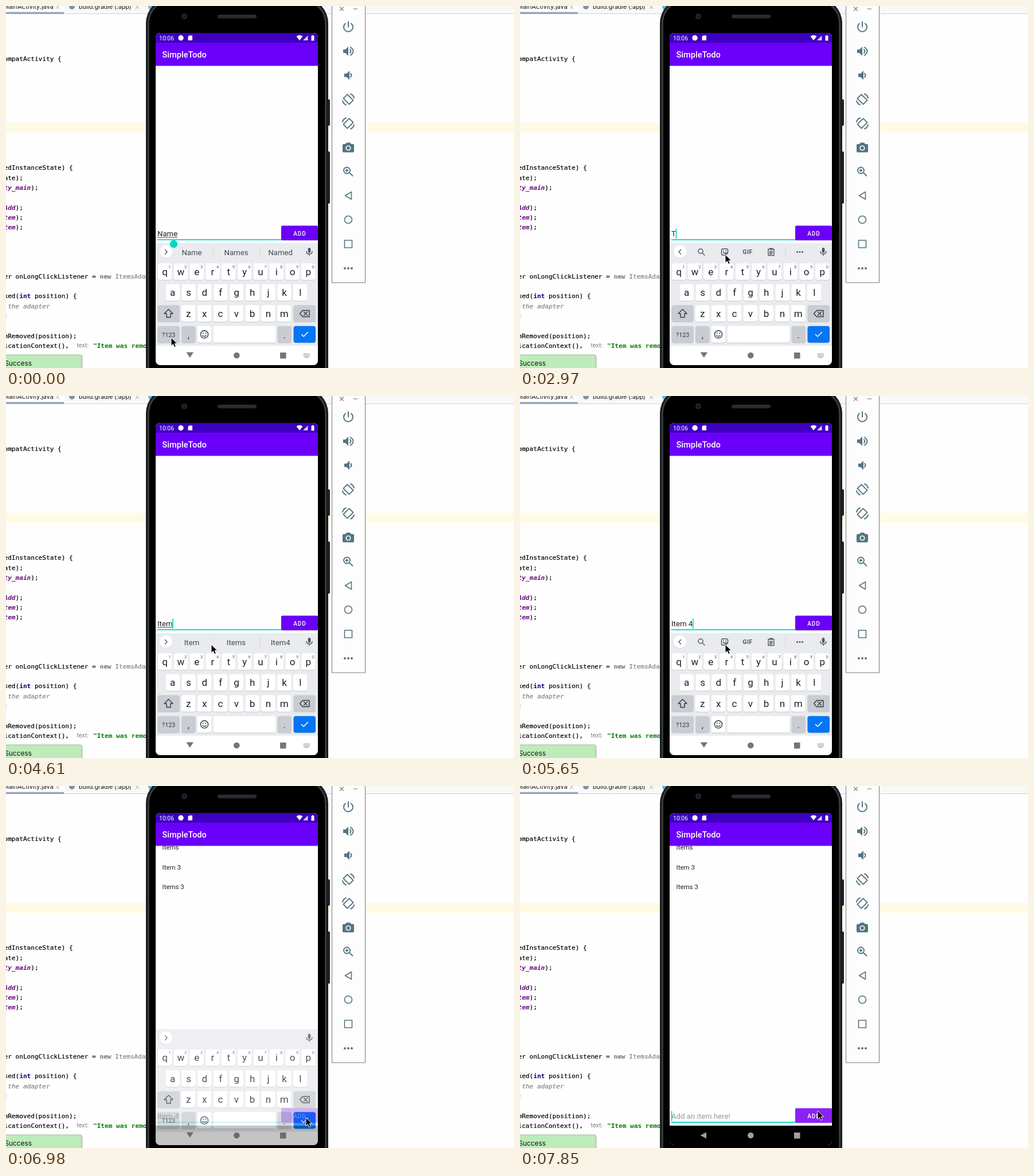
These frames come from a looping animation (886x632 px, 8000 ms). An HTML page:

```html
<!DOCTYPE html>
<html lang="en">
<head>
<meta charset="utf-8">
<title>Todo app demo</title>
<style>
html, body { margin: 0; width: 100%; height: 100%; overflow: hidden; background: #fefefe; }
svg { display: block; width: 100vw; height: 100vh; }
text { white-space: pre; font-family: Roboto, sans-serif; }
.code text { font: 11.1px "DejaVu Sans Mono", monospace; fill: #000; stroke: #000; stroke-width: .2; }
.code .field { font-weight: bold; font-style: italic; fill: #660e7a; stroke: none; }
.code .kw { font-weight: bold; fill: #000080; stroke: none; }
.code .dim { fill: #808080; stroke: #808080; }
.code .note { font-style: italic; fill: #808080; stroke: #808080; }
.code .str { font-weight: bold; fill: #078007; stroke: none; }
.code .hint { font: 10px Inter, sans-serif; fill: #787878; stroke: none; }
.ui { font: 11.8px Inter, sans-serif; fill: #111; }
.mid { text-anchor: middle; }
.line { fill: none; stroke-width: 1.6; stroke-linecap: round; stroke-linejoin: round; }
.tools { color: #537481; }
.tools .line { stroke: currentColor; }
.bar { color: #50565c; }
.bar .line { stroke: currentColor; stroke-width: 1.4; }
.input { font-size: 13.2px; }
</style>
</head>
<body>
<svg viewBox="0 0 886 632" xmlns="http://www.w3.org/2000/svg"></svg>
<script>
const rect = (x, y, w, h, fill, r = 0, more = '') =>
  `<rect x="${x}" y="${y}" width="${w}" height="${h}" rx="${r}" fill="${fill}" ${more}/>`;
const dot = (x, y, r, fill, more = '') => `<circle cx="${x}" cy="${y}" r="${r}" fill="${fill}" ${more}/>`;
const line = (d, more = '') => `<path class="line" d="${d}" ${more}/>`;
const solid = (d, fill = 'currentColor') => `<path d="${d}" fill="${fill}"/>`;
const text = (x, y, s, more = '') => `<text x="${x}" y="${y}" ${more}>${s}</text>`;
const at = (x, y, body) => `<g transform="translate(${x} ${y})">${body}</g>`;
const span = (cls, s) => `<tspan class="${cls}">${s}</tspan>`;

function editor() {
  const rows = [
    [96, 'ompatActivity {'],
    [286, 'edInstanceState) {'],
    [303.5, 'ate);'],
    [321, span('field', 'ty_main') + ');'],
    [355.5, span('field', 'Add') + ');'],
    [372.5, span('field', 'tem') + ');'],
    [390, span('field', 'tem') + ');'],
    [476, 'er onLongClickListener = ' + span('dim', '<tspan font-weight="bold">new</tspan> ItemsAdapter')],
    [510, 'ked(' + span('kw', 'int') + ' position) {'],
    [527.5, span('note', ' the adapter')],
    [545, '<tspan fill="#20808c" stroke="none">;</tspan>'],
    [579.5, 'mRemoved(position);'],
    [596.5, 'icationContext(),']
  ].map(([y, s]) => text(-3.5, y, s)).join('');
  const cross = (x, y) => line(`M${x - 3} ${y - 3}l6 6m0-6l-6 6`, 'stroke="#a5a5a5" style="stroke-width:1"');
  return rect(0, 0, 886, 632, '#fefefe') + rect(0, 0, 886, 13, '#f8f8f8') +
    rect(0, 13, 886, 1, '#d2d2d2') + rect(0, 0, 101, 11, '#fff') + rect(0, 10.5, 101, 3.5, '#98a5b8') +
    text(-5, 5, 'MainActivity.java', 'class="ui" style="font-size:11px"') + cross(90, 2) +
    dot(115, 1, 5, '#85929b') + text(127, 5, 'build.gradle (:app)', 'class="ui" style="font-size:10.6px"') +
    cross(229, 2) + dot(254, 1, 6, '#62b5d6') +
    rect(0, 204, 886, 17, '#fffae3') +
    `<g class="code">${rows}${text(123.5, 596, 'text:', 'class="hint"')}${text(152, 596.5, '"Item was removed"', 'class="str"')}</g>` +
    rect(-5, 610, 139, 30, '#0002', 3) +
    rect(-5, 609, 137, 30, '#bdebba', 2, 'stroke="#9dbf9b"') + text(-2.5, 628, 'Success', 'class="ui"');
}

function emulatorTools() {
  const speaker = solid('M-7-3h4l5-5v16l-5-5h-4z');
  const turn = line('M-1.6-8.6L8.6 1.6L1.6 8.6L-8.6-1.6zM4-9.5q5 2 6 7M-4 9.5q-5-2-6-7', 'style="stroke-width:1.9"');
  const icons = [
    [36, line('M-5-5.5a8 8 0 1 0 10 0M0-8.5v9', 'style="stroke-width:2"')],
    [79, at(-2, 0, speaker) + line('M3-3q3 3 0 6M4-7q9 7 0 14', 'style="stroke-width:1.9"')],
    [121, speaker + line('M4-3q3 3 0 6', 'style="stroke-width:2"')],
    [163, turn],
    [205, `<g transform="scale(-1 1)">${turn}</g>`],
    [247, solid('M-3-8.5h6l2 2.5h3q2 0 2 2v10.5q0 2-2 2h-16q-2 0-2-2v-10.5q0-2 2-2h3z') + dot(0, 1, 4.6, '#fdfdfd') + dot(0, 1, 2.9, 'currentColor')],
    [289, line('M3-2a5.5 5.5 0 1 0-11 0a5.5 5.5 0 1 0 11 0M2 2l5.5 5.5M-4.5-2h4M-2.5-4v4', 'style="stroke-width:1.8"')],
    [331, line('M5.5-6.5v13l-11-6.5z')],
    [373, line('M6.5 0a6.5 6.5 0 1 0-13 0a6.5 6.5 0 1 0 13 0')],
    [415.5, line('M-6.5-6.5h13v13h-13z')],
    [458, [-6, 0, 6].map(x => dot(x, 0, 2, 'currentColor')).join('')]
  ];
  return rect(568.5, -5, 58, 488, '#fdfdfd', 0, 'stroke="#75787a"') +
    line('M582.5 2l6 6m0-6l-6 6M606 5h7', 'stroke="#777" style="stroke-width:1.1"') +
    `<g class="tools">${icons.map(([y, s]) => at(597, y, s)).join('')}</g>`;
}

function phone() {
  return rect(560, 163, 5, 46, '#202124', 2) + rect(560, 254, 5, 91, '#202124', 2) +
    rect(244, -14, 318, 700, '#1b1c1e', 44) +
    rect(248.5, -9.5, 309, 691, '#000', 40, 'stroke="#3e4042" stroke-width="2.5"') +
    dot(311, 18, 5, '#26272a') + dot(311, 18, 2.5, '#0f1724') + rect(369, 15, 68, 6.5, '#2a2b2d', 3.2);
}

function appBar() {
  return rect(261, 47, 283, 17.5, '#3e00bf') + rect(261, 64, 283, 40.5, '#6b00fa') +
    text(267, 59.5, '10:06', 'fill="#fff" font-size="10.5"') + dot(305, 55.7, 4.7, '#fff') +
    solid('M319.5 51.5h5.5v8.5h-7.5v-6.5z', '#fff') +
    solid('M506.5 53q5.5-4 11 0l-5.5 7z', '#fff') + solid('M526.5 51.5v8.5h-8.5z', '#d9ccf4') +
    solid('M534 51h2v1h1.5v8.5h-5v-8.5h1.5z', '#fff') +
    text(272.5, 90, 'SimpleTodo', 'fill="#fff" font-size="14.6" font-weight="500"');
}

function keyboard() {
  const key = (x, y, w, fill = '#fff') => rect(x, y + 1, w, 29, '#c3c6cb', 4) + rect(x, y, w, 29, fill, 4);
  const grey = '#c9cdd3';
  const letters = (row, x0, mid, digits) => [...row].map((c, i) => {
    const x = x0 + i * 27.82;
    return key(x - 12.3, mid - 14.7, 24.6) + text(x, mid + 5.5, c, 'class="mid" font-size="17" fill="#1e2023"') +
      (digits ? text(x + 8.5, mid - 6.5, (i + 1) % 10, 'class="mid" font-size="7.2" fill="#50555a"') : '');
  }).join('');
  const ink = 'stroke="#34383c" style="stroke-width:1.4"';
  return rect(261, 414, 283, 179.5, '#e9ebef') + rect(261, 593, 283, 50, '#fff') +
    letters('qwertyuiop', 277, 464, true) + letters('asdfghjkl', 290.7, 500.5) + letters('zxcvbnm', 318.3, 537) +
    key(264.5, 522.3, 38.5, grey) + key(501.5, 522.3, 38.5, grey) +
    line('M283.5 529.5l7.5 7.5h-4v6.5h-7v-6.5h-4z', ink) +
    line('M517.5 531.5h11.5v11h-11.5l-5-5.5zM519.5 534l6 6m0-6l-6 6', ink) +
    key(264.5, 558.8, 38.5, grey) + text(283.7, 577.5, '?123', 'class="mid" font-size="10.8" fill="#34383c"') +
    key(306, 558.8, 24.6, grey) + text(318.3, 580, ',', 'class="mid" font-size="16" fill="#34383c"') +
    key(333.8, 558.8, 24.6) + dot(346, 573.3, 6.6, 'none', ink) +
    dot(343.6, 571.3, 1, '#34383c') + dot(348.4, 571.3, 1, '#34383c') + line('M342.7 575.3q3.3 3 6.6 0', ink) +
    key(361.5, 558.8, 109) + key(473.5, 558.8, 24.6, grey) +
    text(485.7, 580, '.', 'class="mid" font-size="16" fill="#34383c"') +
    key(501.5, 558.8, 38.5, '#0575f3') + line('M515.5 573.5l3.5 3.5l7.5-7.5', 'stroke="#fff"') +
    dot(279, 430, 11, '#d5d8dc') + dot(279, 429, 11, '#fff') +
    `<g class="bar">${line('', 'id="chevron"')}
      ${rect(526.7, 422, 4.6, 9, 'currentColor', 2.3)}${line('M524 428.5q0 4.5 5 4.5t5-4.5M529 433v2.5')}
      <g id="words">${rect(360.5, 421, 1, 17, '#d3d6da')}${rect(442.5, 421, 1, 17, '#d3d6da')}
        ${[324, 401.5, 478.7].map(x => text(x, 434.5, '', 'class="mid word" font-size="13.2" fill="#454a50"')).join('')}</g>
      <g id="icons">${dot(315, 428, 4, 'none', 'stroke="currentColor" stroke-width="1.5"')}${line('M318 431l4 4')}
        ${line('M353.5 424h7q2 0 2 2v5l-4 4h-5q-2 0-2-2v-7q0-2 2-2M358.5 435v-4h4M354.5 430q2 3 3.5 1')}
        ${dot(354.8, 427.5, 0.9, 'currentColor')}${dot(359.2, 427.5, 0.9, 'currentColor')}
        ${text(397, 433, 'GIF', 'class="mid" font-size="10.5" font-weight="700" fill="currentColor" letter-spacing=".5"')}
        ${line('M433 424.5h10v11h-10zM435.5 428.5h5M435.5 430.7h5M435.5 433h3.5')}${rect(435.3, 422.5, 5.5, 3, 'currentColor', 1)}
        ${rect(462.5, 421, 1, 17, '#d3d6da')}
        ${[483.5, 488, 492.5].map(x => dot(x, 429.5, 1.5, 'currentColor')).join('')}</g>
    </g>`;
}

// Small keyboard glyph at the right end of the navigation bar.
function switcher() {
  const keys = Array.from({ length: 15 }, (_, i) =>
    rect(519 + i % 5 * 2.3, 606.5 + Math.floor(i / 5) * 2.2, 1.4, 1.3, '#888')).join('');
  return `<g id="switcher">${keys}${rect(521, 613, 6.5, 1, '#888')}</g>`;
}

const svg = document.querySelector('svg');
svg.innerHTML = `<defs><clipPath id="screen">${rect(261, 47, 283, 580, '#000', 8)}</clipPath></defs>` +
  editor() + phone() + `<g clip-path="url(#screen)">
    ${rect(261, 47, 283, 580, '#fefefe')}
    <g id="list" font-size="11.5" fill="#222">${['Items', 'Item 3', 'Items 3'].map((s, i) => text(272.5, 111.3 + i * 34.5, s)).join('')}</g>
    ${appBar()}
    <g id="field">
      ${rect(264, 407.2, 217, 1.8, '#00d8c6')}
      ${text(264, 402, '', 'id="value" class="input"')}
      <rect id="mark" x="264" y="403.5" height="1" fill="#444"/>
      <rect id="caret" y="388.5" width="1.6" height="17.5" fill="#00d8c6"/>
      ${rect(480.5, 384.5, 64, 25.3, '#0003', 2)}<rect id="add" x="480" y="383.5" width="64" height="25.5" rx="2"/>
      ${text(512.5, 400.5, 'ADD', 'class="mid" fill="#fff" font-size="10" font-weight="500" letter-spacing=".9"')}
    </g>
    ${rect(261, 593, 283, 40, '#000')}
    <g id="keyboard">${keyboard()}</g>
    <g id="nav"><path id="back"/><circle cx="402.3" cy="610" r="5.3"/><rect x="478" y="605" width="10.5" height="10.5"/></g>
    ${switcher()}
    <path id="handle" d="M292.5 408l4.9 3a6.7 6.7 0 1 1-9.8 0z" fill="#00d8c6"/>
  </g>` + emulatorTools() +
  `<path id="pointer" d="M0 0v14.5l3.4-3.2l2.3 5.3l2.6-1.1l-2.3-5.2h4.6z" fill="#000" stroke="#fff" stroke-width=".9"/>`;

const LOOP = 8000;
// [time, changes]; each step keeps whatever it does not change.
const steps = [
  [0, { value: 'Name', pos: 3, caret: 0, handle: 1, marked: 4, words: ['Name', 'Names', 'Named'], ptr: [288, 579], kb: 'open', add: '#6b00f8' }],
  [150, { ptr: [305, 550] }],
  [290, { ptr: [342, 471] }],
  [440, { ptr: [358, 434], handle: 0, caret: 1 }],
  [890, { caret: 0 }],
  [1340, { caret: 1 }],
  [1490, { pos: 4 }],
  [1780, { value: 'Nam', pos: 3, marked: 3 }],
  [1930, { words: ['Nam', 'Name', 'Names'] }],
  [2080, { value: 'Na', pos: 2, marked: 2 }],
  [2230, { value: 'N', pos: 1, marked: 1, words: ['Na', 'Nah', 'Name'] }],
  [2380, { value: '', pos: 0, marked: 0, words: null }],
  [2830, { caret: 0 }],
  [2970, { value: 'T', pos: 1, caret: 1 }],
  [3270, { marked: 1, words: ['T', 'The', 'Today'] }],
  [3420, { value: '', pos: 0, marked: 0, words: null }],
  [3870, { value: 'I', pos: 1 }],
  [4010, { value: 'It', pos: 2, marked: 1, words: ['I', 'I’m', 'It'] }],
  [4160, { value: 'Ite', pos: 3, marked: 2, words: ['It', 'It’s', 'Its'] }],
  [4310, { value: 'Item', pos: 4, marked: 3, words: ['Ite', 'Item', 'Items'] }],
  [4610, { marked: 4, words: ['Item', 'Items', 'Item4'] }],
  [5060, { value: 'Item ', pos: 5, marked: 0 }],
  [5200, { words: null }],
  [5350, { value: 'Item 4', pos: 6 }],
  [5940, { ptr: [378, 452] }],
  [6090, { ptr: [438, 506] }],
  [6240, { ptr: [498, 558], caret: 0 }],
  [6390, { ptr: [519, 576] }],
  [6530, { ptr: [523, 579] }],
  [6680, { caret: 1 }],
  [6980, { kb: 'closing', words: [], caret: 0 }],
  [7130, { kb: 'closed', ptr: [522, 575] }],
  [7270, { ptr: [520, 569] }],
  [7420, { ptr: [519, 567], caret: 1 }],
  [7710, { value: '', pos: 0, add: '#8a22f7' }]
];
const states = [];
for (const [time, change] of steps) states.push({ ...states.at(-1), ...change, time });

const $ = id => document.getElementById(id);
const show = (id, on) => { $(id).style.display = on ? '' : 'none'; };
const ruler = document.createElement('canvas').getContext('2d');
const width = s => { ruler.font = '13.2px Roboto, sans-serif'; return ruler.measureText(s).width; };
const wordEls = [...document.querySelectorAll('.word')];

function draw(s) {
  const open = s.kb === 'open', closing = s.kb === 'closing';
  $('value').textContent = s.value || 'Add an item here!';
  $('value').setAttribute('fill', s.value ? '#222' : '#999');
  $('mark').setAttribute('width', width(s.value.slice(0, s.marked)));
  $('caret').setAttribute('x', 263.8 + width(s.value.slice(0, s.pos)));
  $('add').setAttribute('fill', s.add);
  show('caret', s.caret);
  show('handle', s.handle);
  show('list', !open);
  show('switcher', open);
  show('keyboard', s.kb !== 'closed');
  $('field').setAttribute('transform', `translate(0 ${open ? 0 : 179})`);
  $('keyboard').setAttribute('transform', `translate(0 ${closing ? 10.5 : 0})`);
  $('keyboard').setAttribute('opacity', closing ? 0.77 : 1);
  $('nav').setAttribute('fill', open ? '#757575' : closing ? '#6c6c6c' : '#a0a0a0');
  $('back').setAttribute('d', s.kb === 'closed' ? 'M325 604.5v11l-10.5-5.5z' : 'M314.5 604.5h12.5l-6.25 9.5z');
  $('chevron').setAttribute('d', s.words ? 'M277.5 425.5l3.5 3.7l-3.5 3.7' : 'M280.5 425.5l-3.5 3.7l3.5 3.7');
  show('words', s.words && s.words.length);
  show('icons', !s.words);
  wordEls.forEach((el, i) => { el.textContent = s.words?.[i] ?? ''; });
  $('pointer').setAttribute('transform', `translate(${s.ptr})`);
}

let shown;
function tick() {
  const time = performance.now() % LOOP;
  const state = states.findLast(s => s.time <= time);
  if (state !== shown) draw(shown = state);
  requestAnimationFrame(tick);
}
tick();
</script>
</body>
</html>
```
